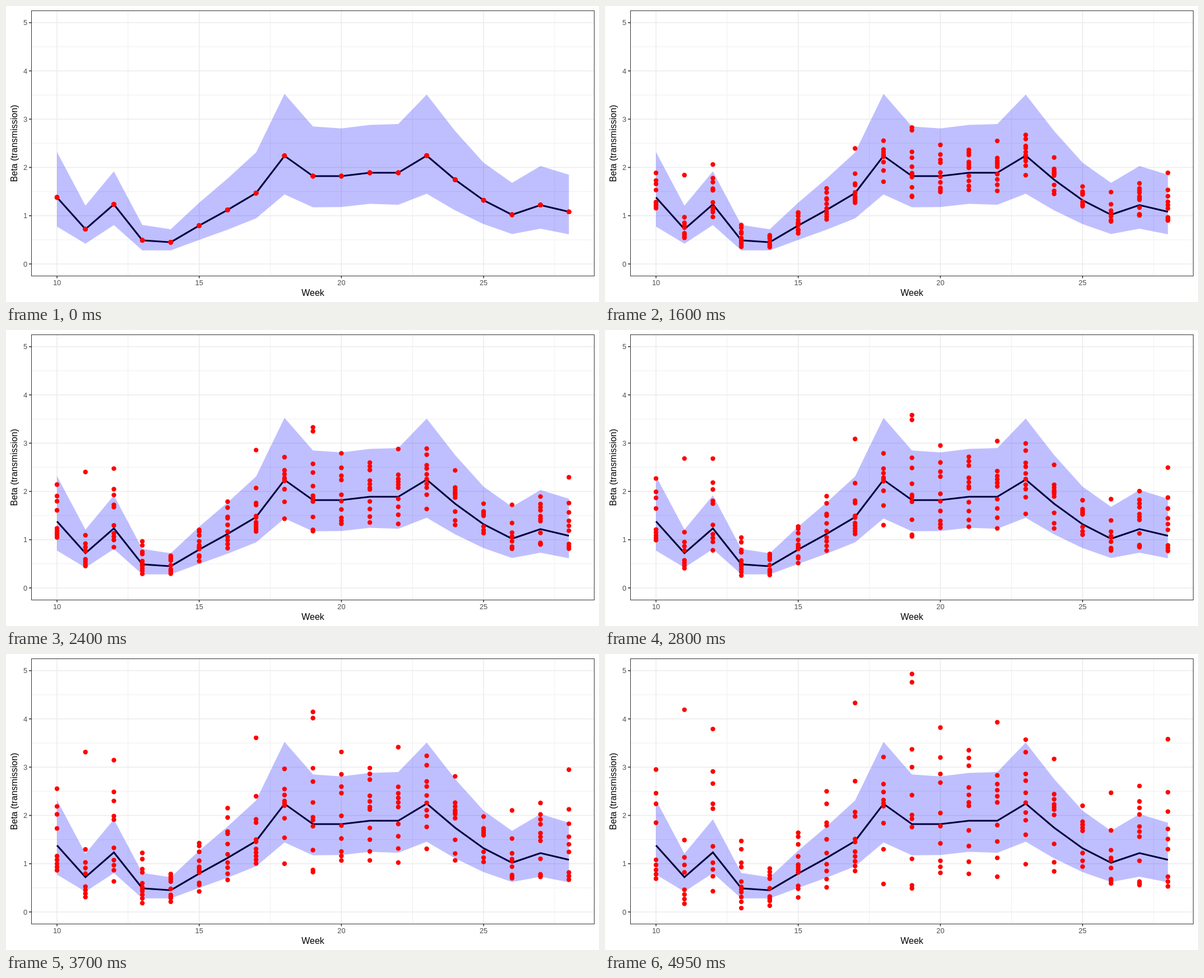
Write an HTML page with a canvas that moves like this. It is 1058x529 px and loops after 5000 ms.

```html
<!DOCTYPE html>
<html lang="en">
<head>
<meta charset="utf-8">
<title>Beta by week</title>
<style>
  html, body { margin: 0; width: 100%; height: 100%; overflow: hidden; background: #fff; }
  canvas { display: block; }
</style>
</head>
<body>
<canvas id="chart" width="1058" height="529"></canvas>
<script>
const ctx = document.getElementById("chart").getContext("2d");
const panel = { left: 45.5, top: 8.5, right: 1049.5, bottom: 482.5 };
const STEP = 50, STEPS = 100;

const mid = [1.38, .72, 1.235, .49, .45, .795, 1.12, 1.47, 2.24, 1.82,
  1.82, 1.89, 1.89, 2.245, 1.745, 1.32, 1.02, 1.22, 1.08];
const high = [2.32, 1.21, 1.92, .81, .72, 1.27, 1.77, 2.31, 3.525, 2.85,
  2.81, 2.88, 2.9, 3.51, 2.755, 2.1, 1.68, 2.03, 1.85];
const low = [.775, .42, .805, .28, .28, .5, .71, .945, 1.44, 1.175,
  1.18, 1.245, 1.225, 1.455, 1.11, .825, .62, .73, .615];

// Final dot values per week; blanks are spread evenly between their neighbours.
const spread = [
  [2.95, 2.46, 2.24, 1.85, 1.08,, .87,, .69],
  [4.19, 1.49, 1.13,, .82, .46,,, .17],
  [3.79, 2.91, 2.66, 2.24, 2.14, 1.36, 1.02,, .74, .43],
  [1.47, 1.3, 1.02, .93, .63, .52,, .41,, .21, .08],
  [.9,,, .69, .49, .32,, .23, .13],
  [1.64, 1.56, 1.4, 1.15, .98,,, .82, .54, .48, .3],
  [2.5, 2.24, 1.85, 1.79,, 1.22, .99, .85,, .51],
  [4.33, 2.71, 2.07, 1.98, 1.51, 1.45, 1.25,,,, .85],
  [3.21, 2.65,, 2.32,, 2.19, 1.84, 1.3, .58],
  [4.93, 4.76, 3.37, 3, 2.42, 2.01, 1.93, 1.76, 1.1, .55, .49],
  [3.82, 3.2, 2.86, 2.68, 2.05, 1.78,, 1.06,, .81],
  [3.35,, 3.03, 2.58,, 2.27, 2.2, 1.69,, 1.04, .79],
  [3.93, 2.83, 2.65,,, 2.27, 1.8,, 1.12, .73],
  [3.57, 3.31, 2.86, 2.72, 2.47,, 2.06, 1.9, 1.6, .99],
  [3.17, 2.44,, 2.23,, 2.12, 2.01, 1.41, 1.03, .84],
  [2.2, 1.87,,, 1.68, 1.22, 1.06, .94],
  [2.47, 1.69, 1.28, 1.12, 1.07, .91, .68,, .59],
  [2.61, 2.29,, 2.02, 1.77,, 1.56, 1.06, .63,, .56],
  [3.58, 2.48, 2.08, 1.72,, 1.3, .73,, .53],
].map(fillBlanks);

function fillBlanks(row) {
  const full = [row[0]];
  for (let a = 0, b = 1; b < row.length; b++) {
    if (row[b] === undefined) continue;
    for (let i = a + 1; i <= b; i++) full[i] = row[a] + (row[b] - row[a]) * (i - a) / (b - a);
    a = b;
  }
  return full;
}

const px = week => 91 + (week - 10) * 50.74;
const py = value => 461 - value * 86.25;

function line(x1, y1, x2, y2, color, width) {
  ctx.strokeStyle = color;
  ctx.lineWidth = width;
  ctx.beginPath();
  ctx.moveTo(x1, y1);
  ctx.lineTo(x2, y2);
  ctx.stroke();
}

function label(text, x, y, size, color, align = "center") {
  ctx.font = `${size}px "Liberation Sans", Arial, sans-serif`;
  ctx.fillStyle = color;
  ctx.textAlign = align;
  ctx.fillText(text, x, y);
}

const column = (week, width) => line(px(week), panel.top, px(week), panel.bottom, "#ebebeb", width);
const row = (value, width) => line(panel.left, py(value), panel.right, py(value), "#ebebeb", width);
const trace = values => values.forEach((v, i) => ctx.lineTo(px(10 + i), py(v)));

function drawAxes() {
  for (let v = .5; v < 5; v++) row(v, .8);
  for (let w = 12.5; w < 28; w += 5) column(w, .8);
  for (let v = 0; v <= 5; v++) {
    row(v, 1.56);
    line(panel.left - 4.5, py(v), panel.left, py(v), "#333", 1.56);
    label(v, 38, py(v) + 4.6, 12.8, "#4d4d4d", "right");
  }
  for (let w = 10; w <= 25; w += 5) {
    column(w, 1.56);
    line(px(w), panel.bottom, px(w), panel.bottom + 4, "#333", 1.56);
    label(w, px(w), 499, 12.8, "#4d4d4d");
  }
  label("Week", 547.5, 517.5, 16, "#000");
  ctx.save();
  ctx.translate(19.5, 245.5);
  ctx.rotate(-Math.PI / 2);
  label("Beta (transmission)", 0, 0, 16, "#000");
  ctx.restore();
}

function drawBand() {
  ctx.strokeStyle = "#000";
  ctx.lineWidth = 3.1;
  ctx.beginPath();
  trace(mid);
  ctx.stroke();
  ctx.fillStyle = "rgba(0, 0, 255, .25)";
  ctx.beginPath();
  trace(high);
  for (let i = low.length - 1; i >= 0; i--) ctx.lineTo(px(10 + i), py(low[i]));
  ctx.fill();
}

function drawDots(progress) {
  ctx.fillStyle = "#f00";
  spread.forEach((values, i) => values.forEach(end => {
    ctx.beginPath();
    ctx.arc(px(10 + i), py(mid[i] + (end - mid[i]) * progress), 4.2, 0, 7);
    ctx.fill();
  }));
}

function draw(time) {
  const step = Math.floor(time / STEP) % STEPS;
  ctx.clearRect(0, 0, 1058, 529);
  drawAxes();
  drawBand();
  drawDots(step / (STEPS - 1));
  ctx.strokeStyle = "#333";
  ctx.lineWidth = 1;
  ctx.strokeRect(panel.left, panel.top, panel.right - panel.left, panel.bottom - panel.top);
}

const start = performance.now();
function tick() {
  draw(performance.now() - start);
  requestAnimationFrame(tick);
}
tick();
</script>
</body>
</html>
```
